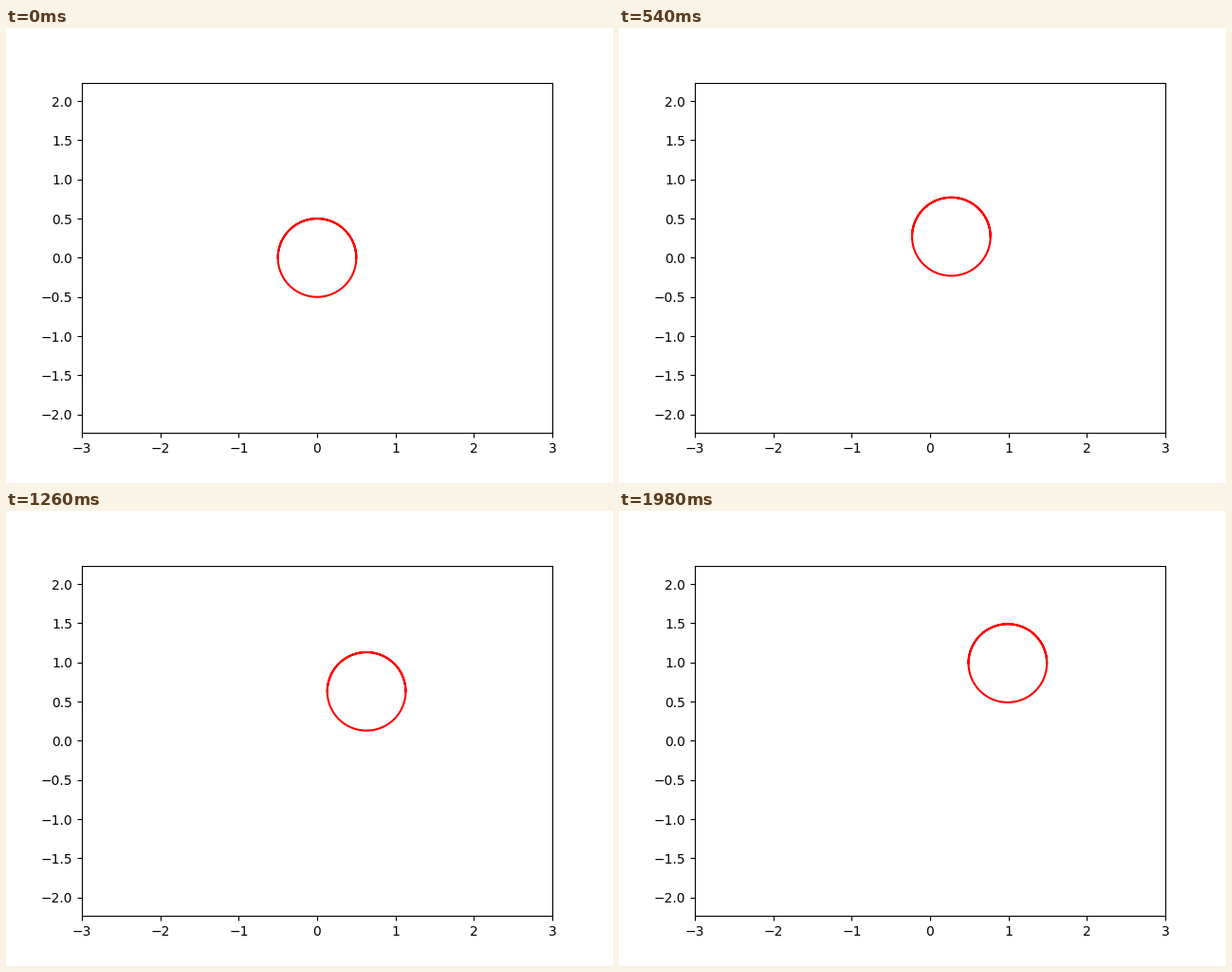
Animation, 640 px wide and 480 px high, one loop 2000 ms. Source, as a matplotlib script:

```python
import numpy as np
import matplotlib.pyplot as plt
from matplotlib.animation import FuncAnimation

FRAMES = 100
INTERVAL = 20
RADIUS = 0.5
STEP = 0.01

fig, ax = plt.subplots(figsize=(6.4, 4.8), dpi=100)
ax.set_xlim(-3, 3)
half_height = 3 * (4.8 * 0.77) / (6.4 * 0.775)  # equal scale on both axes
ax.set_ylim(-half_height, half_height)

# One and a half turns: the upper half is traced twice and looks bolder.
theta = np.linspace(0, 3 * np.pi, 301)
circle_x = RADIUS * np.cos(theta)
circle_y = RADIUS * np.sin(theta)
line, = ax.plot(circle_x, circle_y, color="red", lw=1.5)


def update(i):
    shift = STEP * i
    line.set_data(circle_x + shift, circle_y + shift)
    return line,


anim = FuncAnimation(fig, update, frames=FRAMES, interval=INTERVAL,
                     repeat=True, repeat_delay=0)
plt.show()
```
